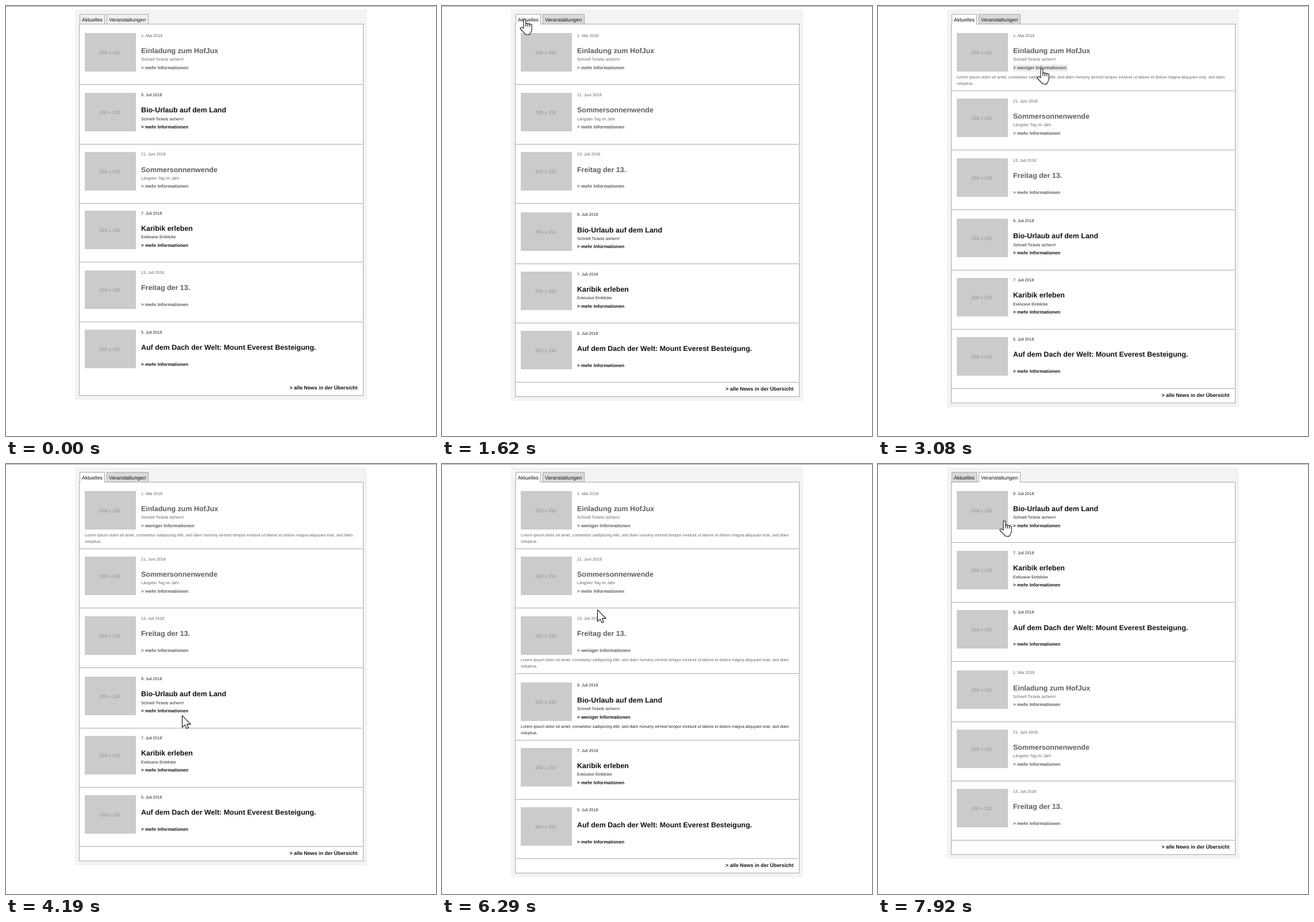
Write an HTML page that moves like this. It is 748 by 748 pixels and loops after 8 s.

```html
<!DOCTYPE html>
<html lang="de">
<head>
<meta charset="utf-8">
<title>Aktuelles</title>
<style>
html, body { margin: 0; width: 100%; height: 100%; overflow: hidden; background: #fff; }
svg { display: block; width: 748px; height: 748px; font-family: "Liberation Sans", Arial, sans-serif; text-rendering: geometricPrecision; }
.small { font-size: 7.12px; }
.title { font-size: 12.46px; font-weight: bold; }
.link { font-size: 8.01px; font-weight: bold; }
.tab { font-size: 8.9px; }
.all { font-size: 8.9px; font-weight: bold; }
.size { font-size: 8.2px; fill: #929292; }
.cursor { fill: #fff; stroke: #111; stroke-width: 1.1; stroke-linejoin: round; }
</style>
</head>
<body>
<svg id="stage" viewBox="0 0 748 748"></svg>
<script>
const LOOP = 8000;
const LINE = '#a8a8a8';
const EXTRA = 10.68;   // height of the unfolded text
const stage = document.getElementById('stage');

const items = [
  { date: '1. Mai 2018', title: 'Einladung zum HofJux', sub: 'Schnell Tickets sichern!', event: true },
  { date: '9. Juli 2018', title: 'Bio-Urlaub auf dem Land', sub: 'Schnell Tickets sichern!' },
  { date: '21. Juni 2018', title: 'Sommersonnenwende', sub: 'Längster Tag im Jahr', event: true },
  { date: '7. Juli 2018', title: 'Karibik erleben', sub: 'Exklusive Einblicke' },
  { date: '13. Juli 2018', title: 'Freitag der 13.', sub: '', event: true },
  { date: '5. Juli 2018', title: 'Auf dem Dach der Welt: Mount Everest Besteigung.', sub: '' }
];
const lorem = [
  'Lorem ipsum dolor sit amet, consetetur sadipscing elitr, sed diam nonumy eirmod tempor invidunt ut labore et dolore magna aliquyam erat, sed diam',
  'voluptua.'
];

const mixedRows = [0, 103.4, 206.6, 309, 412.4, 516];
const groupedRows = [0, 103.4, 206.6, 311.6, 414.8, 517.8];

// Page states: start time, active tab, item order, unfolded items
const pages = [
  { at: 0, tab: -1, order: [0, 1, 2, 3, 4, 5], open: [] },
  { at: 1620, tab: 0, order: [0, 2, 4, 1, 3, 5], open: [] },
  { at: 3000, tab: 0, order: [0, 2, 4, 1, 3, 5], open: [0] },
  { at: 4800, tab: 0, order: [0, 2, 4, 1, 3, 5], open: [0, 1] },
  { at: 5890, tab: 0, order: [0, 2, 4, 1, 3, 5], open: [0, 1, 4] },
  { at: 7450, tab: 1, order: [1, 3, 5, 0, 2, 4], open: [] }
];

// Pointer moves: first step, last step, number of steps, end point
const entry = { x: 590, y: 725 };
const moves = [
  [150, 540, 6, 136, 74],
  [930, 1150, 4, 143, 17],
  [1400, 1400, 1, 144, 22],
  [2080, 2400, 5, 270, 136],
  [2480, 2700, 4, 285, 108],
  [3560, 3950, 6, 301, 409],
  [4190, 4190, 1, 306, 437],
  [4260, 4260, 1, 306, 440],
  [4490, 4640, 3, 300, 431],
  [5260, 5494, 4, 291, 339],
  [5572, 5650, 2, 287, 328],
  [6290, 6520, 4, 220, 26],
  [6670, 6670, 1, 224, 37],
  [6850, 7060, 3, 211, 22],
  [7850, 7850, 1, 215, 58],
  [7920, 7920, 1, 220, 98]
];
const hidden = t => t < 150 || (t >= 610 && t < 930);

const tabs = [
  { name: 'Aktuelles', x: 128, w: 44, textX: 132 },
  { name: 'Veranstaltungen', x: 175, w: 73, textX: 179 }
];

const rect = (x, y, w, h, fill) =>
  `<rect x="${x}" y="${y}" width="${w}" height="${h}" fill="${fill}"/>`;
const text = (cls, x, y, str, fill, anchor = 'start') =>
  `<text class="${cls}" x="${x}" y="${Math.round(y)}" fill="${fill}" text-anchor="${anchor}">${str.replace('>', '&gt;')}</text>`;
const inside = (p, b) => p && p.x >= b.x && p.x < b.x + b.w && p.y >= b.y && p.y < b.y + b.h;

function pointerAt(t) {
  if (hidden(t)) return null;
  let from = entry;
  for (const [start, end, n, x, y] of moves) {
    if (t < start) break;
    if (start === 930) from = { x: 124, y: 6 };
    const step = n > 1 ? Math.floor((t - start) / (end - start) * (n - 1) + 0.01) + 1 : 1;
    const k = Math.min(1, step / n);
    from = { x: from.x + (x - from.x) * k, y: from.y + (y - from.y) * k };
  }
  return { x: Math.round(from.x), y: Math.round(from.y) };
}

function layout(page) {
  const base = page.tab < 0 ? mixedRows : groupedRows;
  let shift = 0;
  const rows = page.order.map((id, i) => {
    const y = base[i] + shift;
    const open = page.open.includes(id);
    if (open) shift += EXTRA;
    const link = { x: 235, y: Math.round(109.8 + y) - 8, w: open ? 95 : 85, h: 12 };
    const image = { x: 137, y: Math.round(47.3 + y), w: 89, h: 67 };
    return { item: items[id], y, open, link, image, end: Math.round(136.3 + base[i] + shift) };
  });
  return { rows, bottom: Math.round((page.tab < 0 ? 677.4 : 679.4) + shift) };
}

function drawTab(tab, i, active) {
  const on = i === active;
  const fill = on ? '#fff' : active < 0 ? '#f0f0f0' : '#d9dadc';
  return rect(tab.x, 14, tab.w, 17, LINE) +
    rect(tab.x + 1, 15, tab.w - 2, on ? 17 : 16, fill) +
    text('tab', tab.textX, 27, tab.name, '#111');
}

function drawRow(row, last, mixed, pointer) {
  const { item, y, open, link, image } = row;
  const ink = item.event ? '#5e5e5e' : '#111';
  const soft = item.event ? '#666' : '#222';
  let out = rect(image.x, image.y, image.w, image.h, '#cbcbca') +
    text('size', 180.5, image.y + 37, '200 x 150', '#929292', 'middle') +
    text('small', 235, 53.8 + y, item.date, soft) +
    text('title', 235, 82 + y, item.title, ink) +
    text('small', 235, 95.4 + y, item.sub, soft);
  if (inside(pointer, link)) out += rect(link.x, link.y, link.w, link.h, '#ebebeb');
  out += text('link', 235, 109.8 + y, open ? '> weniger Informationen' : '> mehr Informationen', ink);
  if (open) lorem.forEach((line, i) => { out += text('small', 137, 126 + y + i * EXTRA, line, soft); });
  if (!(last && mixed)) out += rect(128, row.end, 492, 1, LINE);
  return out;
}

function drawPointer(p, hand) {
  const shape = hand
    ? 'M7 17V2.6a1.9 1.9 0 0 1 3.8 0V9.6a1.7 1.7 0 0 1 3.4 .4a1.7 1.7 0 0 1 3.4 .8a1.7 1.7 0 0 1 3.6 1V19C21.2 22 19 23 19 25.5Q18 28 14 28Q10 28 9 25.8L1.4 18C0 15.8 2.2 14.2 4.2 15.4ZM10.8 9.6V14M14.2 10V14.3M17.6 10.8V14.6'
    : 'M.5 .6V21.2L5.2 16.9L8.2 23.2L11.4 21.8L8.5 15.6H15.3Z';
  return `<path class="cursor" transform="translate(${p.x - (hand ? 9 : 0)} ${p.y})" d="${shape}"/>`;
}

function scene(t) {
  const page = pages.filter(p => p.at <= t).pop();
  const pointer = pointerAt(t);
  const { rows, bottom } = layout(page);
  const hotspots = tabs.map(tab => ({ x: tab.x, y: 14, w: tab.w, h: 18 }));
  rows.forEach(row => hotspots.push(row.link, row.image));

  let out = rect(0, 0, 748, 748, '#fff') + rect(0, 0, 748, 1, '#a0a0a0') +
    rect(120, 6, 508, bottom + 2, '#f2f3f4') +
    rect(127, 31, 495, bottom - 30, LINE) +
    rect(128, 32, 493, bottom - 32, '#fff');
  tabs.forEach((tab, i) => { out += drawTab(tab, i, page.tab); });
  rows.forEach((row, i) => { out += drawRow(row, i === 5, page.tab < 0, pointer); });
  out += text('all', 611.5, bottom - 10, '> alle News in der Übersicht', '#111', 'end');
  if (pointer) out += drawPointer(pointer, hotspots.some(b => inside(pointer, b)));
  return out;
}

let shown = '';
function update(now) {
  const next = scene(now % LOOP);
  if (next !== shown) stage.innerHTML = shown = next;
  requestAnimationFrame(update);
}
update(performance.now());
</script>
</body>
</html>
```
